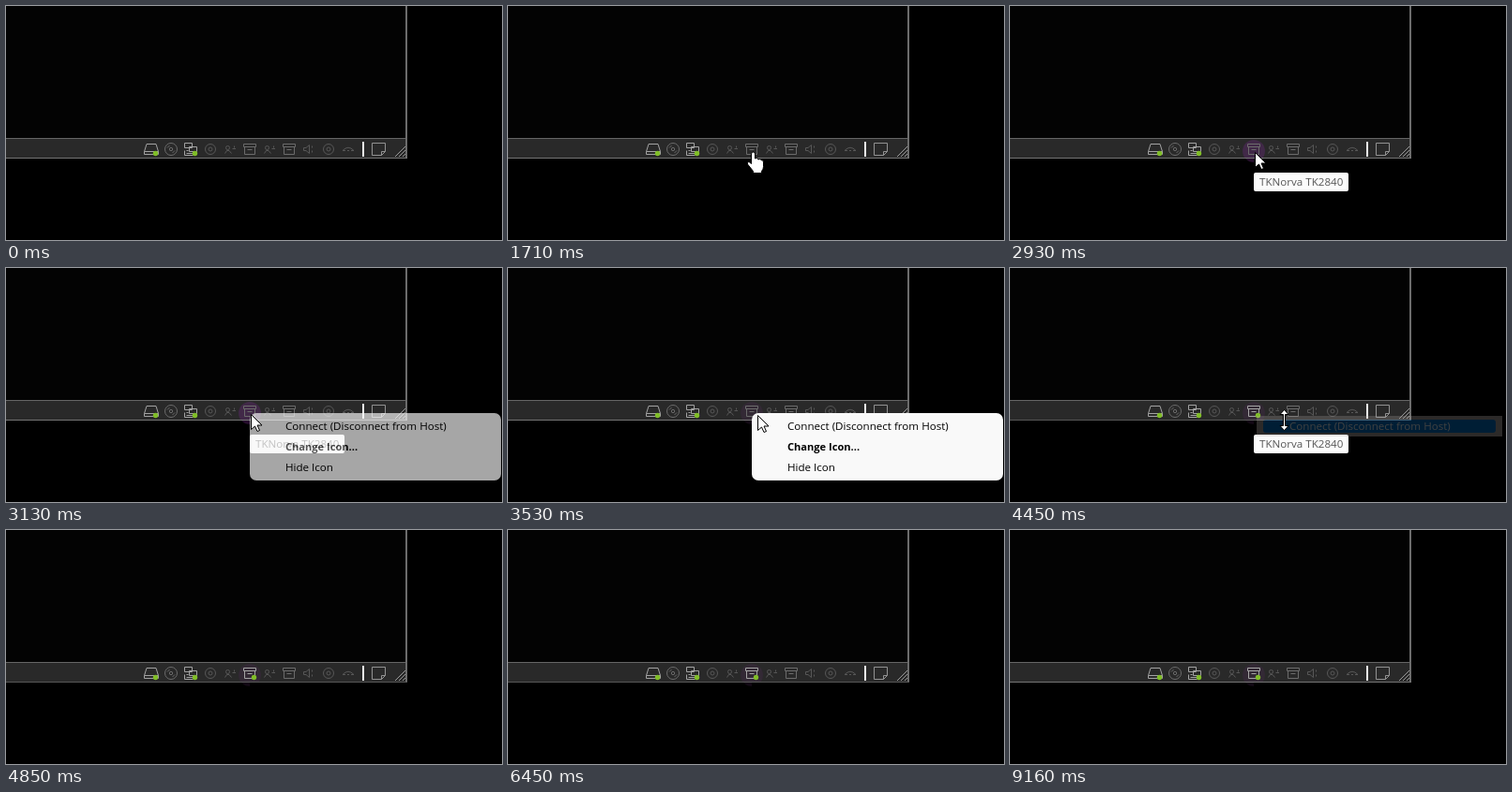
Animation of 529x250 px, one loop 9.26 s. Source, as an HTML page with a canvas:

```html
<!DOCTYPE html>
<html lang="en">
<head>
<meta charset="utf-8">
<title>Status bar device menu</title>
<style>
html, body { margin: 0; width: 100%; height: 100%; overflow: hidden; background: #000; }
body { position: relative; font: 11.6px/17px "Open Sans", "Noto Sans", sans-serif; color: #000; }
canvas, div { position: absolute; white-space: nowrap; }
canvas { left: 0; top: 0; }
#tip { left: 260px; top: 178px; width: 101px; height: 20px; box-sizing: border-box; padding-left: 6px;
  line-height: 20px; color: #575757; background: #fbfbfb; border-radius: 2px; }
#menu { left: 260px; top: 155px; width: 268px; height: 72px; background: #f9f9f9; border-radius: 7px; }
#menu div { left: 38px; }
.first { top: 5px; }
.second { top: 27px; font-weight: bold; font-size: 11.1px; }
.third { top: 49px; }
#menu .bar, #strip .bar { left: 10px; top: 7px; width: 248px; height: 14px; background: #0078d4; border-radius: 3px; }
#strip { left: 263px; top: 158px; width: 262px; height: 22px; background: #b0a8a4; }
#strip .bar { left: 7px; top: 4px; }
#strip .first { left: 35px; top: 2px; color: #fff; }
</style>
</head>
<body>
<canvas id="base" width="529" height="250"></canvas>
<div id="tip">TKNorva TK2840</div>
<div id="menu">
  <div class="bar"></div>
  <div class="first">Connect (Disconnect from Host)</div>
  <div class="second">Change Icon...</div>
  <div class="third">Hide Icon</div>
</div>
<div id="strip">
  <div class="bar"></div>
  <div class="first">Connect (Disconnect from Host)</div>
</div>
<canvas id="top" width="529" height="250"></canvas>
<script>
const LOOP = 9260;
const $ = s => document.querySelector(s);
const g = $('#base').getContext('2d');
const o = $('#top').getContext('2d');
const tip = $('#tip'), menu = $('#menu'), strip = $('#strip');
const hover = $('#menu .bar'), item = $('#menu .first');

const shapes = {
  disk: 'M-5 -5.5H5L7.5 2.5V5.5H-7.5V2.5ZM-7.5 2.5H7.5',
  disc: 'M6.5 0A6.5 6.5 0 1 1 -6.5 0A6.5 6.5 0 1 1 6.5 0M1.7 0A1.7 1.7 0 1 1 -1.7 0A1.7 1.7 0 1 1 1.7 0M-4 -1.5L-1.5 -4M1.5 4L4 1.5',
  net: 'M-6.5 -6.5H1.5V-1.5H-6.5ZM-1.5 -2.5H6.5V2.5H-1.5ZM-6.5 1.5V6.5H2.5M-4.5 1.5H-2.5M-4.5 4.5H2.5',
  camera: 'M5.5 0A5.5 5.5 0 1 1 -5.5 0A5.5 5.5 0 1 1 5.5 0M2 0A2 2 0 1 1 -2 0A2 2 0 1 1 2 0',
  person: 'M-5.5 4.5L-3.5 1.5H-1L1.5 4.5M-.5 -1.5A2 2 0 1 1 -4.5 -1.5A2 2 0 1 1 -.5 -1.5M2.5 -.5H6M4.5 -3.5V-1.5',
  box: 'M-6.5 -5.5H6.5V-2.5H-6.5ZM-5.5 -2.5V5.5H5.5V-2.5M-2.5 .5H2.5',
  sound: 'M-5.5 -1.5H-3L.5 -4.5V4.5L-3 1.5H-5.5ZM3.5 -3.5V-1.5M3.5 1.5V3.5',
  link: 'M-6 1.5Q0 -5 6 1.5M-6 1.5H-3M3 1.5H6M-1 1.5H1',
  note: 'M-6.5 -6.5H7.5V2.5L3.5 6.5H-6.5ZM3.5 6.5V2.5H7.5'
};
for (const k in shapes) shapes[k] = new Path2D(shapes[k]);

const row = ['disk', 'disc', 'net', 'camera', 'person', 'box', 'person', 'box', 'sound', 'camera', 'link'];

const cursors = {
  arrow: new Path2D('M0 0V16L4 12.5L6.5 18L9 17L6.5 11.5H11.5Z'),
  hand: new Path2D('M-2 2Q0 -1 2 2V7.5Q4 6 5.5 8.5Q7.5 7 8.5 9.2Q11 8.5 11 11.5V16Q11 19 9 21V23H0V21L-6 13.5Q-7 11 -4.5 11L-2 13Z'),
  resize: new Path2D('M0 -11L4.5 -6H1V6H4.5L0 11L-4.5 6H-1V-6H-4.5Z')
};

const clamp = x => Math.max(0, Math.min(1, x));
const within = (t, a, b) => t >= a && t < b;
const mix = (a, b, p) => a + (b - a) * p;
const easeOut = p => 1 - (1 - p) ** 2;
const smooth = p => p * p * (3 - 2 * p);
// Progress that advances in 100 ms ticks
const ticks = (t, start, count) => clamp((Math.floor((t - start) / 100) + 1) / count);

function rect(x, y, w, h, color) {
  g.fillStyle = color;
  g.fillRect(x, y, w, h);
}

function disc(c, x, y, r, color) {
  c.fillStyle = color;
  c.beginPath();
  c.arc(x, y, r, 0, 7);
  c.fill();
}

function icon(name, x, color) {
  g.save();
  g.translate(x, 153);
  g.strokeStyle = color;
  g.stroke(shapes[name]);
  g.restore();
}

function drawWindow(t) {
  const linked = t >= 4250;
  const edge = within(t, 4250, 9160) ? '#575757' : '#747474';
  rect(0, 0, 529, 250, '#000');
  rect(0, 0, 426, 141, '#030303');
  rect(0, 141, 427, 21, '#292929');
  rect(0, 141, 427, 1, '#666');
  rect(0, 162, 428, 1, edge);
  rect(426, 0, 2, 162, '#6c6c6c');

  if (t >= 2930) {
    g.save();
    g.beginPath();
    g.rect(240, 142, 40, 20);
    g.rect(240, 163, 20, 10);
    g.clip();
    disc(g, 260, 155, 12, within(t, 2930, 3230) ? 'rgba(110,40,130,.35)' : 'rgba(90,40,100,.2)');
    g.restore();
  }

  g.lineWidth = 1;
  row.forEach((name, i) => {
    const lit = i === 0 || i === 2 || (i === 5 && linked);
    icon(name, 155 + 21 * i, lit ? '#a3a3a3' : i === 1 || name === 'box' ? '#6b6b6b' : '#575757');
  });
  icon('note', 397, '#929292');
  rect(380, 145, 2, 16, '#eee');

  g.strokeStyle = '#999';
  g.beginPath();
  for (const d of [3, 7, 11]) {
    g.moveTo(426 - d, 161);
    g.lineTo(426, 161 - d);
  }
  g.stroke();

  const green = '#80bd28';
  disc(g, 159.5, 157.5, 2.7, green);
  disc(g, 201.5, 157.5, 2.7, green);
  if (linked) {
    const busy = within(t, 6040, 6240) || within(t, 6340, 6450);
    disc(g, 264.5, 157.5, 2.7, busy ? '#a3df4c' : green);
  }
}

function pointer(t) {
  if (t < 1110 || t >= 4850) return null;
  if (t < 2930) {
    const p = easeOut((ticks(t, 1110, 7) * 7 - 1) / 6);
    const y = mix(227, 155, p);
    return [y < 160 ? 'hand' : 'arrow', mix(283, 261, p), y];
  }
  if (t < 4350) {
    const p = smooth(ticks(t, 3530, 4));
    return ['arrow', mix(261, 293, p), mix(156, 163, p)];
  }
  if (t < 4550) return ['resize', 292, 162];
  const p = ticks(t, 4550, 3);
  return ['arrow', mix(292, 300, p), mix(162, 206, p)];
}

function drawPointer(t) {
  o.clearRect(0, 0, 529, 250);
  if (within(t, 4150, 4250)) disc(o, 292, 162, 12, 'rgba(222,204,40,.75)');
  const c = pointer(t);
  if (!c) return;
  const shape = cursors[c[0]];
  o.save();
  o.translate(Math.round(c[1]) + .5, Math.round(c[2]) + .5);
  o.lineWidth = 1;
  o.strokeStyle = '#000';
  o.fillStyle = '#fff';
  o.fill(shape);
  o.stroke(shape);
  o.restore();
}

function drawPopups(t) {
  let tipAlpha = 0;
  if (within(t, 2230, 3230)) tipAlpha = ticks(t, 2230, 2);
  else if (within(t, 4350, 4750)) tipAlpha = t < 4450 ? .5 : 1;
  else if (within(t, 4750, 4850)) tipAlpha = .4;
  tip.style.opacity = tipAlpha;

  menu.style.opacity = within(t, 3030, 4250) ? ticks(t, 3030, 3) : 0;
  const over = t >= 3630;
  hover.style.opacity = over ? 1 : 0;
  item.style.color = over ? '#fff' : '#000';

  strip.style.opacity = within(t, 4250, 4550) ? [.8, .5, .25][Math.floor((t - 4250) / 100)] : 0;
}

const start = performance.now();
function frame() {
  const t = (performance.now() - start) % LOOP;
  drawWindow(t);
  drawPopups(t);
  drawPointer(t);
  requestAnimationFrame(frame);
}
frame();
</script>
</body>
</html>
```
